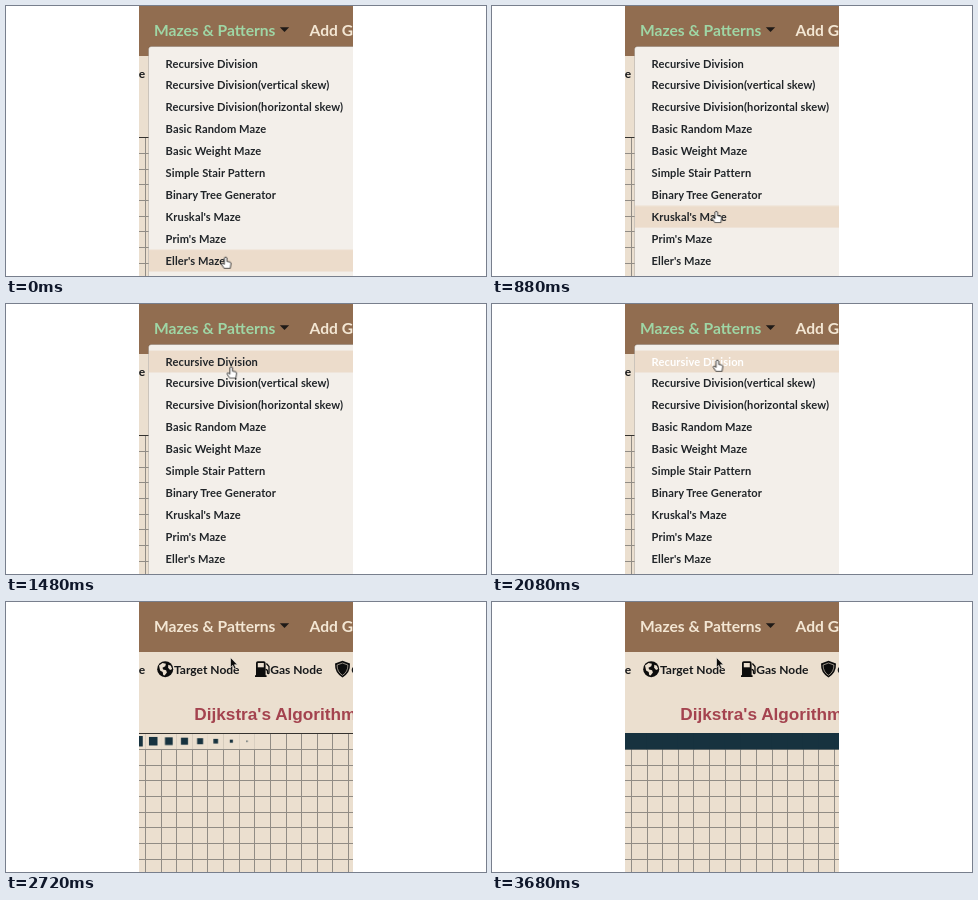
An HTML page for the animation above (4.16 s loop, 480 by 270 pixels).

```html
<!DOCTYPE html>
<html lang="en">
<head>
<meta charset="utf-8">
<title>Maze menu</title>
<style>
  html, body { margin: 0; width: 100%; height: 100%; overflow: hidden; background: #fff; }
  svg { display: block; width: 480px; height: 270px; }
  text { font-family: Lato, "Open Sans", sans-serif; font-weight: 700; fill: #212529; }
  .nav { font-size: 15.6px; fill: #f3e6d3; }
  .label { font-size: 12px; fill: #16181a; }
  .item { font-size: 11.1px; letter-spacing: .1px; }
  .title { font: bold 17.2px "Liberation Sans", Arial, sans-serif; fill: #a4434f; }

  .open, .menu, .hover, .pressed, .walls, .cell, .wall, .hand, .arrow {
    animation: 4160ms linear infinite both;
  }
  .open { animation-name: open; }
  .menu { animation-name: menu; animation-timing-function: step-end; }
  .hover { animation-name: hover; animation-timing-function: step-end; }
  .pressed { animation-name: pressed; animation-timing-function: step-end; }
  .walls { animation-name: walls; animation-timing-function: step-end; }
  .cell { animation-name: cell; animation-timing-function: step-end; animation-delay: var(--delay); }
  .wall {
    animation-name: grow; animation-delay: var(--delay);
    transform-box: fill-box; transform-origin: center;
  }
  .hand { animation-name: move, hand; animation-timing-function: linear, step-end; }
  .arrow { animation-name: arrow; animation-timing-function: step-end; }

  @keyframes open {
    0%, 51.92% { fill: #9fd6a5; }
    54.8%, 100% { fill: #f3e6d3; }
  }
  @keyframes menu {
    0% { visibility: visible; }
    51.92%, 100% { visibility: hidden; }
  }
  /* one row pitch is 21.89px */
  @keyframes hover {
    0% { transform: translateY(197.01px); }
    13.46% { transform: translateY(175.12px); }
    18.27% { transform: translateY(153.23px); }
    22.11% { transform: translateY(131.34px); }
    25% { transform: translateY(109.45px); }
    25.96% { transform: translateY(87.56px); }
    27.4% { transform: translateY(65.67px); }
    29.8% { transform: translateY(43.78px); }
    31.73% { transform: translateY(21.89px); }
    34.61%, 100% { transform: translateY(0); }
  }
  @keyframes pressed {
    0% { fill: #212529; }
    50%, 100% { fill: #fff; }
  }
  @keyframes move {
    0%, 11.5% { transform: translate(219.6px, 250.8px); }
    21.15% { transform: translate(224.3px, 205.3px); }
    24.04% { transform: translate(225px, 181px); }
    27.88% { transform: translate(226.4px, 124.8px); }
    31.25% { transform: translate(226px, 94px); }
    35.57% { transform: translate(225.2px, 62.6px); }
    37.5% { transform: translate(225.4px, 56.6px); }
    40.38%, 100% { transform: translate(225.4px, 55.8px); }
  }
  @keyframes hand {
    0% { visibility: visible; }
    52.88%, 100% { visibility: hidden; }
  }
  @keyframes arrow {
    0% { visibility: hidden; }
    52.88%, 100% { visibility: visible; }
  }
  @keyframes walls {
    0% { opacity: 0; }
    53.84%, 100% { opacity: 1; }
  }
  @keyframes cell {
    0% { opacity: 0; }
    61.68%, 100% { opacity: 1; }
  }
  @keyframes grow {
    0%, 61.67% { transform: scale(0); }
    61.68% { transform: scale(.07); animation-timing-function: ease-out; }
    64.71% { transform: scale(.48); }
    67.74% { transform: scale(1.17); }
    70.34%, 100% { transform: scale(1); }
  }
</style>
</head>
<body>
<svg viewBox="0 0 480 270">
  <defs>
    <clipPath id="view"><rect x="133" width="214" height="270"/></clipPath>
  </defs>
  <g clip-path="url(#view)">
    <rect x="133" width="214" height="270" fill="#ebdfcf"/>
    <rect x="133" width="214" height="50" fill="#916d50"/>
    <text class="nav open" x="148" y="29.5">Mazes &amp; Patterns</text>
    <path d="M273.8 21.3h9.4l-4.7 4.6z" fill="#1f1a17"/>
    <text class="nav" x="303.5" y="29.5">Add Gas Node</text>

    <text class="label" x="139.2" y="71.8" text-anchor="end">Start Node</text>
    <g>
      <circle cx="159.2" cy="67.2" r="8" fill="#0c0c0c"/>
      <path d="M153 63.5l3.5-2.6 3.4.8-.6 2.6-2.8 1.5.6 1.8 3 .7.8 2.2-2.3 3-1.4-.4-.5-3-2.6-1.7zM162.3 62.8l2.6 1 1.2 3.2-2 .9-2-2.2z" fill="#ebdfcf"/>
    </g>
    <text class="label" x="168" y="71.8">Target Node</text>
    <g fill="#0c0c0c">
      <path d="M250 61q0-1.8 1.8-1.8h6q1.8 0 1.8 1.8v12.2h1v1.8h-11.6v-1.8h1z"/>
      <rect x="251.8" y="61" width="6" height="4.3" fill="#ebdfcf"/>
      <path d="M259.5 67.5q2 0 2 2v1.6q.9 1.2 1.5-.2v-6.4l-2.6-3" fill="none" stroke="#0c0c0c" stroke-width="1.3"/>
    </g>
    <text class="label" x="264.3" y="71.8">Gas Node</text>
    <path d="M336.5 58.8l7.5 2.8q.5 9.5-7.5 13.8-8-4.300-7.5-13.800z" fill="#0c0c0c"/>
    <path d="M336.500 61l5.400 2q.1 6.900-5.400 10.300-5.500-3.400-5.400-10.300z" fill="none" stroke="#ebdfcf" stroke-width=".6"/>
    <text class="label" x="345.300" y="71.800">C</text>

    <text class="title" x="188.300" y="117.500">Dijkstra's Algorithm</text>

    <path id="grid" fill="none" stroke="#918c85"/>
    <path d="M133 131.500h214" stroke="#34322f"/>
    <g class="walls" id="walls"></g>

    <g class="menu">
      <rect x="142.500" y="40.500" width="260" height="260" rx="3" fill="#f3efea" stroke="#000" stroke-opacity=".15"/>
      <rect class="hover" x="143" y="46.600" width="210" height="21.900" fill="#ecdccb"/>
      <g id="items"></g>
    </g>

    <path class="hand" d="M-1.300 1Q0-.8 1.300 1V4.600L4.300 5.200Q5.600 5.600 5.400 7L4.600 11.600H-1.400L-4.100 7.600Q-4.300 5.900-2.800 6.400L-1.300 7.500Z"
      fill="#fff" stroke="#111" stroke-width=".8" stroke-linejoin="round"/>
    <path class="arrow" d="M224.500 55.500v9.800l2.200-2 1.600 3.600 1.700-.8-1.600-3.400h3z"
      fill="#0a0a0a" stroke="#f4eee6" stroke-width=".6"/>
  </g>
</svg>
<script>
  const left = 139.4, top0 = 132, pitch = 15.63;
  const stagger = 22, rowHeight = 21.89;
  const names = [
    "Recursive Division", "Recursive Division(vertical skew)",
    "Recursive Division(horizontal skew)", "Basic Random Maze",
    "Basic Weight Maze", "Simple Stair Pattern", "Binary Tree Generator",
    "Kruskal's Maze", "Prim's Maze", "Eller's Maze"
  ];

  function add(parent, tag, attrs) {
    const node = document.createElementNS("http://www.w3.org/2000/svg", tag);
    for (const key in attrs) node.setAttribute(key, attrs[key]);
    return parent.appendChild(node);
  }
  const byId = id => document.getElementById(id);
  const crisp = v => Math.floor(v) + 0.5;

  let lines = "";
  for (let i = 0; i < 14; i++) lines += `M${crisp(left + i * pitch)} 132V270`;
  for (let j = 1; j < 9; j++) lines += `M133 ${crisp(top0 + j * pitch)}H347`;
  byId("grid").setAttribute("d", lines);

  // each cell clears its borders, then its wall grows
  const cells = Array.from({ length: 15 }, (_, k) => ({
    x: left + (k - 1) * pitch,
    style: `--delay:${k * stagger}ms`
  }));
  for (const { x, style } of cells) {
    add(byId("walls"), "rect", { class: "cell", style, x, y: 132, width: pitch, height: 15, fill: "#ebdfcf" });
  }
  for (const { x, style } of cells) {
    add(byId("walls"), "rect", {
      class: "wall", style, fill: "#17323f",
      x: x - 0.4, y: 131, width: pitch + 0.8, height: 16.4
    });
  }

  names.forEach((name, i) => {
    const cls = i ? "item" : "item pressed";
    add(byId("items"), "text", { class: cls, x: 159.6, y: 61.6 + i * rowHeight }).textContent = name;
  });
</script>
</body>
</html>
```
